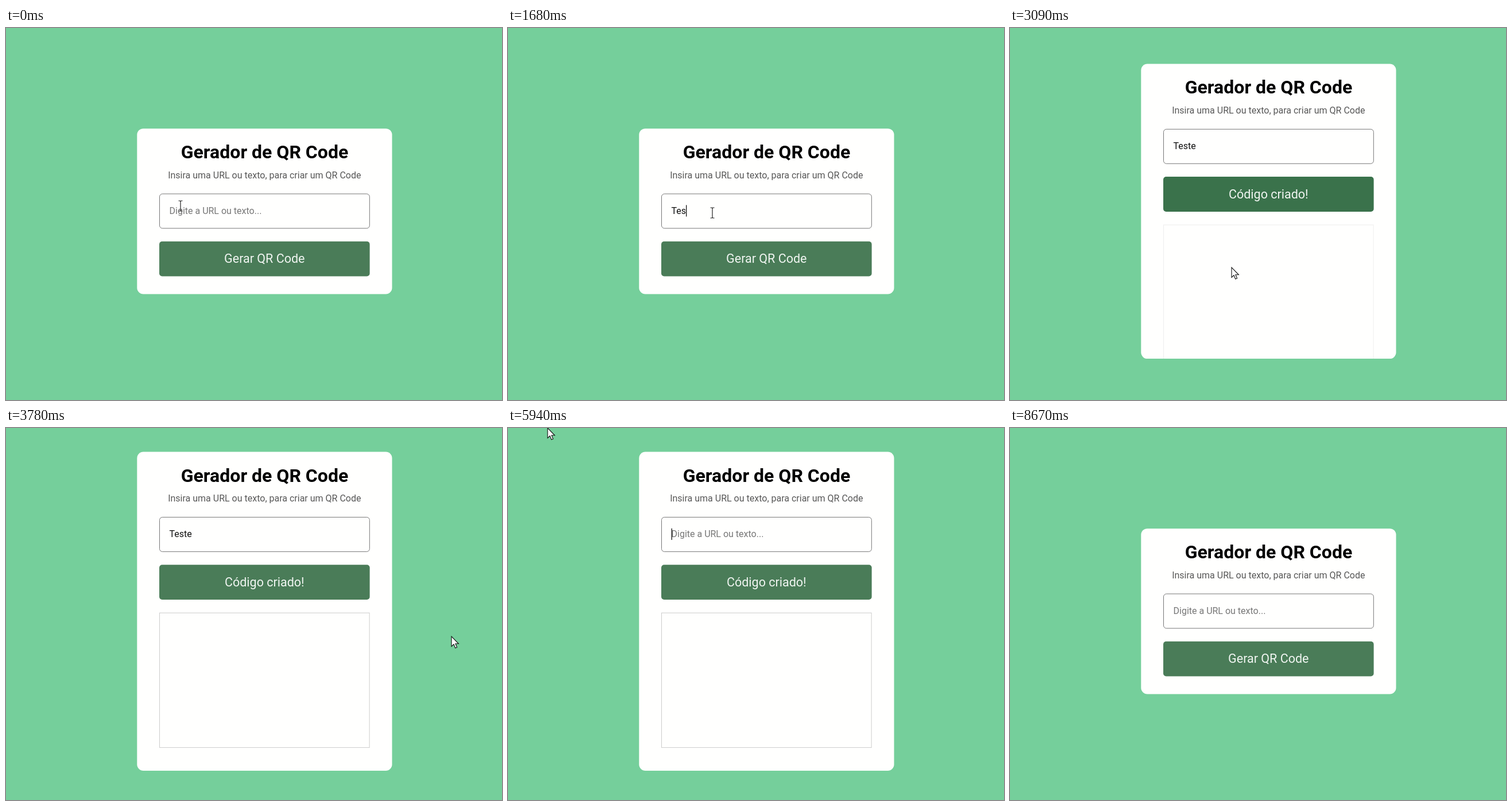
Animation, 864 px wide and 648 px high, one loop 8.7 s. Source, as an HTML page:

```html
<!DOCTYPE html>
<html lang="pt-BR">
<head>
<meta charset="utf-8">
<title>Gerador</title>
<style>
  html, body { margin: 0; width: 100%; height: 100%; overflow: hidden; background: #75cf9b; }
  svg { display: block; width: 864px; height: 648px; }
  text { font-family: Roboto, Arial, sans-serif; font-size: 16px; }
  .middle { text-anchor: middle; }
</style>
</head>
<body>
<svg viewBox="0 0 864 648">
  <defs>
    <clipPath id="clip"><rect id="clipRect" x="228.3" width="444.2" rx="11"/></clipPath>
  </defs>
  <rect width="864" height="648" fill="#75cf9b"/>
  <rect id="card" x="228.3" width="444.2" rx="11" fill="#fffffe"/>
  <g clip-path="url(#clip)">
    <g id="content">
      <text class="middle" x="450.5" y="52" style="font-size:32px;font-weight:700">Gerador de QR Code</text>
      <text class="middle" x="450.3" y="86.6" fill="#575757">Insira uma URL ou texto, para criar um QR Code</text>
      <rect x="267.5" y="113.8" width="365.8" height="60" rx="5" fill="none" stroke="#777"/>
      <text id="value" x="284.5" y="148.8"></text>
      <rect id="caret" x="285" y="133.3" width="1.2" height="20"/>
      <rect id="button" x="267" y="196.6" width="366.6" height="60.8" rx="5"/>
      <text id="label" class="middle" x="450.3" y="234.3" fill="#f0f5f1" style="font-size:21.5px"></text>
      <rect id="result" x="267.5" y="280.5" width="365.6" height="234.5" fill="none" stroke="#ccc"/>
    </g>
  </g>
  <path id="arrow" d="M0 0V17.5L4 13.8L6.7 20.2L9.6 19L6.9 12.8H12.4Z" fill="#fff" stroke="#111" stroke-width="1.1"/>
  <path id="beam" d="M-3.5 -9H-1L0 -8L1 -9H3.5M0 -8V8M-3.5 9H-1L0 8L1 9H3.5" fill="none" stroke="#222" stroke-width="1.2"/>
</svg>
<script>
const LOOP = 8700, OPEN = 2982, CLOSE = 6020, CENTER = 319.3;
const BLINK = 500, GONE = 7650;
const el = id => document.getElementById(id);
const clamp = v => Math.min(1, Math.max(0, v));
const mix = (a, b, k) => a + (b - a) * k;
const smooth = k => k * k * (3 - 2 * k);

// CSS "ease": cubic-bezier(.25, .1, .25, 1)
function ease(x) {
  if (x <= 0 || x >= 1) return clamp(x);
  const bez = (a, b, s) => 3 * a * s * (1 - s) ** 2 + 3 * b * s * s * (1 - s) + s ** 3;
  let lo = 0, hi = 1;
  for (let i = 0; i < 24; i++) {
    const s = (lo + hi) / 2;
    if (bez(.25, .25, s) < x) lo = s; else hi = s;
  }
  return bez(.1, 1, lo);
}

// time, text, focused
const edits = [
  [0, "", false], [750, "", true],
  [1440, "T", true], [1550, "Te", true], [1650, "Tes", true],
  [1800, "Test", true], [1900, "Teste", true],
  [2660, "Teste", false], [4450, "Teste", true], [5880, "", true]
];

// time, x, y
const path = [
  [0, 304, 310], [600, 356, 322], [2200, 356, 322], [2580, 386, 417],
  [3180, 386, 417], [3580, 764, 372], [3740, 776, 363], [3900, 776, 363],
  [4380, 335, 186], [4700, 335, 186], [5300, 69, 0], [6180, 69, 0],
  [6330, 67, 20], [6600, 56, 34]
];

const lastBefore = (list, t) => list.filter(e => e[0] <= t).pop();

function pointerAt(t) {
  const a = lastBefore(path, t), b = path[path.indexOf(a) + 1];
  if (!b) return [a[1], a[2]];
  const k = smooth((t - a[0]) / (b[0] - a[0]));
  return [mix(a[1], b[1], k), mix(a[2], b[2], k)];
}

function set(node, attrs) {
  for (const name in attrs) node.setAttribute(name, attrs[name]);
}

const between = (t, start, duration) => ease(clamp((t - start) / duration));
const toggle = (t, duration) => between(t, OPEN, duration) - between(t, CLOSE, duration);

function draw(t) {
  const height = mix(288.3, 555.4, toggle(t, 200));
  const top = CENTER - height / 2;
  set(el("card"), { y: top, height });
  set(el("clipRect"), { y: top, height });
  set(el("content"), { transform: `translate(0 ${top})` });
  set(el("result"), { opacity: toggle(t, 500) });

  const [since, text, focused] = lastBefore(edits, t);
  const value = el("value");
  value.textContent = text || "Digite a URL ou texto...";
  set(value, { fill: text ? "#111" : "#777" });
  const caretOn = focused && Math.floor((t - since) / BLINK) % 2 === 0;
  set(el("caret"), {
    x: 284.6 + (text ? value.getComputedTextLength() : 0),
    opacity: caretOn ? 1 : 0
  });

  el("label").textContent = t >= OPEN && t < CLOSE ? "Código criado!" : "Gerar QR Code";
  set(el("button"), { fill: t > 2500 && t < 3150 ? "#3a724b" : "#4a7c58" });

  const [x, y] = pointerAt(t);
  const overInput = x > 267 && x < 633 && y > top + 113 && y < top + 174;
  const shown = t < GONE;
  const place = `translate(${x} ${y})`;
  set(el("beam"), { transform: place, opacity: shown && overInput ? 1 : 0 });
  set(el("arrow"), { transform: place, opacity: shown && !overInput ? 1 : 0 });
}

const start = performance.now();
function tick() {
  draw((performance.now() - start) % LOOP);
  requestAnimationFrame(tick);
}
tick();
</script>
</body>
</html>
```
